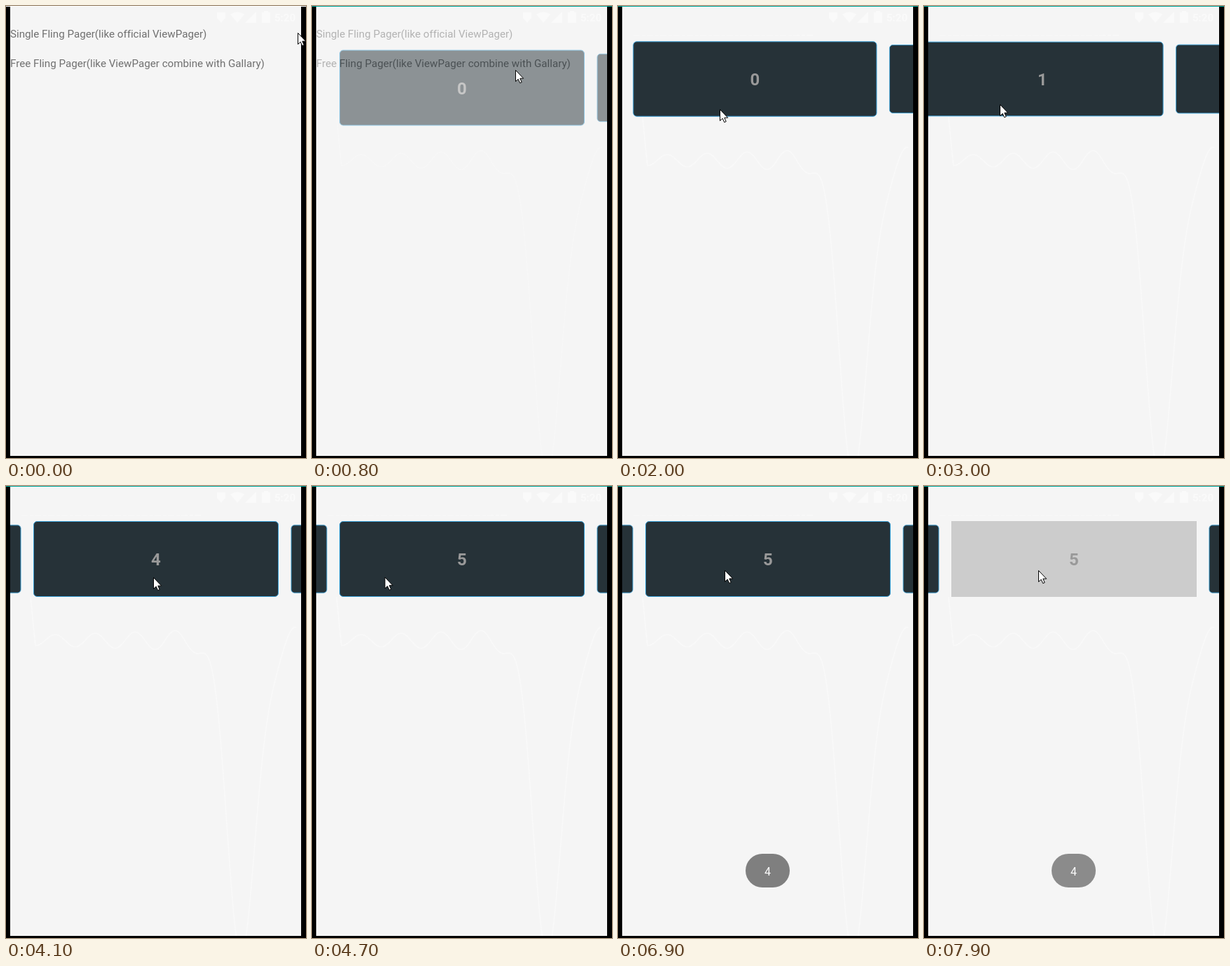
Animation of 428 by 644 pixels, one loop 8 s. Source, as an HTML page:

```html
<!DOCTYPE html>
<html lang="en">
<head>
<meta charset="utf-8">
<title>Fling pager</title>
<style>
  html, body { margin: 0; width: 100%; height: 100%; overflow: hidden; background: #000; }
  svg { display: block; width: 428px; height: 644px; font-family: Roboto, sans-serif; }
  #menu { fill: #707070; font-size: 15.17px; font-variant-ligatures: none; }
  .card rect { fill: #263238; stroke: #3ba3da; }
  .card text { fill: #999; font-weight: bold; font-size: 24px; text-anchor: middle; }
  .card.pressed rect { fill: #ccc; stroke: #ccc; rx: 0; }
  .faint { fill: none; stroke: #f9f9f9; stroke-width: 1.5; }
</style>
</head>
<body>
<svg viewBox="0 0 428 644">
  <rect x="6" y="1" width="415" height="640" fill="#f5f5f5"/>

  <g id="menu">
    <text x="6" y="44.5">Single Fling Pager(like official ViewPager)</text>
    <text x="6" y="86.5">Free Fling Pager(like ViewPager combine with Gallary)</text>
  </g>

  <g id="page">
    <rect x="6" y="1" width="415" height="640" fill="#f5f5f5"/>
    <path id="trace" class="faint"/>
    <path class="faint" d="M22 42H278" stroke-dasharray="9 3 5 2"/>
    <g id="cards"></g>
  </g>

  <g id="status" fill="#fafafa">
    <path d="M301 9h12v8l-6 7-6-7zM320 12q10-7 20 0l-10 12zM357 8v16h-16zM365 9h3v-2h6v2h3v15h-12z"/>
    <text x="383" y="22" font-size="15" font-weight="bold">5:20</text>
  </g>

  <g id="toast">
    <rect x="182" y="524" width="63" height="48" rx="24" fill="#7f7f7f"/>
    <text x="213.5" y="555" fill="#fff" font-size="16" text-anchor="middle">4</text>
  </g>

  <path d="M0 0H6V641H421V0H428V644H0Z"/>
  <rect id="edge" width="428" height="1"/>
  <path id="cursor" d="M.5 .5V16.5L4.2 13.2L6.7 18.7L9.2 17.6L6.8 12.2H11.7Z" fill="#fff" stroke="#000"/>
</svg>

<script>
const $ = id => document.getElementById(id);
const LOOP = 8000, STEP = 100, PITCH = 350, MID_X = 214, MID_Y = 104;

// Moves: [start, end, ...values to reach]
const pointer = [
  [0, 500, 290, 91], [900, 1300, 276, 146], [1300, 1500, 266, 150],
  [1600, 2000, 145, 147], [2000, 2400, 356, 148], [2400, 2700, 278, 135],
  [2800, 3000, 108, 140], [3000, 4100, 210, 130], [4100, 4400, 104, 133],
  [4500, 4900, 103, 126], [5000, 5600, 15, 117], [5900, 7100, 163, 120]
];
const scroll = [[1935, 2400, 1], [2900, 3700, 4], [4100, 4400, 5]];
const opening = [[600, 1000, 1]];
const toast = [[5780, 6400, 1], [7800, 8300, 0]];

function follow(moves, t, from) {
  return moves.reduce((pos, [start, end, ...to]) => {
    const p = Math.min(1, Math.max(0, (t - start) / (end - start)));
    const eased = p * p * (3 - 2 * p);
    return pos.map((v, i) => v + (to[i] - v) * eased);
  }, from);
}

// Faint ripple with one deep dip
let trace = 'M35 158';
for (let x = 42; x <= 415; x += 3) {
  const ripple = (6 + x / 30) * Math.cos((x - 70) / 57 * 2 * Math.PI);
  const dip = 440 * Math.exp(-(((x - 337) / 30) ** 2));
  trace += `L${x} ${220 - ripple + dip}`;
}
$('trace').setAttribute('d', trace);

$('cards').innerHTML = Array.from({ length: 7 }, (_, i) =>
  `<g class="card"><rect x="-174.5" y="-53.5" width="349" height="107" rx="5"/>
   <text y="9">${i}</text></g>`).join('');
const cards = [...$('cards').children];

function draw(t) {
  const [current] = follow(scroll, t, [0]);
  cards.forEach((card, i) => {
    const offset = i - current;
    const scale = 1 - .1 * Math.min(1, Math.abs(offset));
    card.setAttribute('transform', `translate(${MID_X + offset * PITCH} ${MID_Y}) scale(${scale})`);
    card.classList.toggle('pressed', i === 5 && t >= 7800);
  });

  const [open] = follow(opening, t, [0]);
  $('page').setAttribute('opacity', open);
  $('cards').setAttribute('transform', `translate(0 ${50 * (1 - open) ** 2})`);
  $('edge').setAttribute('fill', t < 500 ? '#fff' : '#00a99d');
  $('toast').setAttribute('opacity', follow(toast, t, [0])[0]);
  $('cursor').setAttribute('transform', `translate(${follow(pointer, t, [416, 38])})`);
}

function frame(now) {
  draw(Math.floor(now % LOOP / STEP) * STEP);
  requestAnimationFrame(frame);
}
draw(0);
requestAnimationFrame(frame);
</script>
</body>
</html>
```
